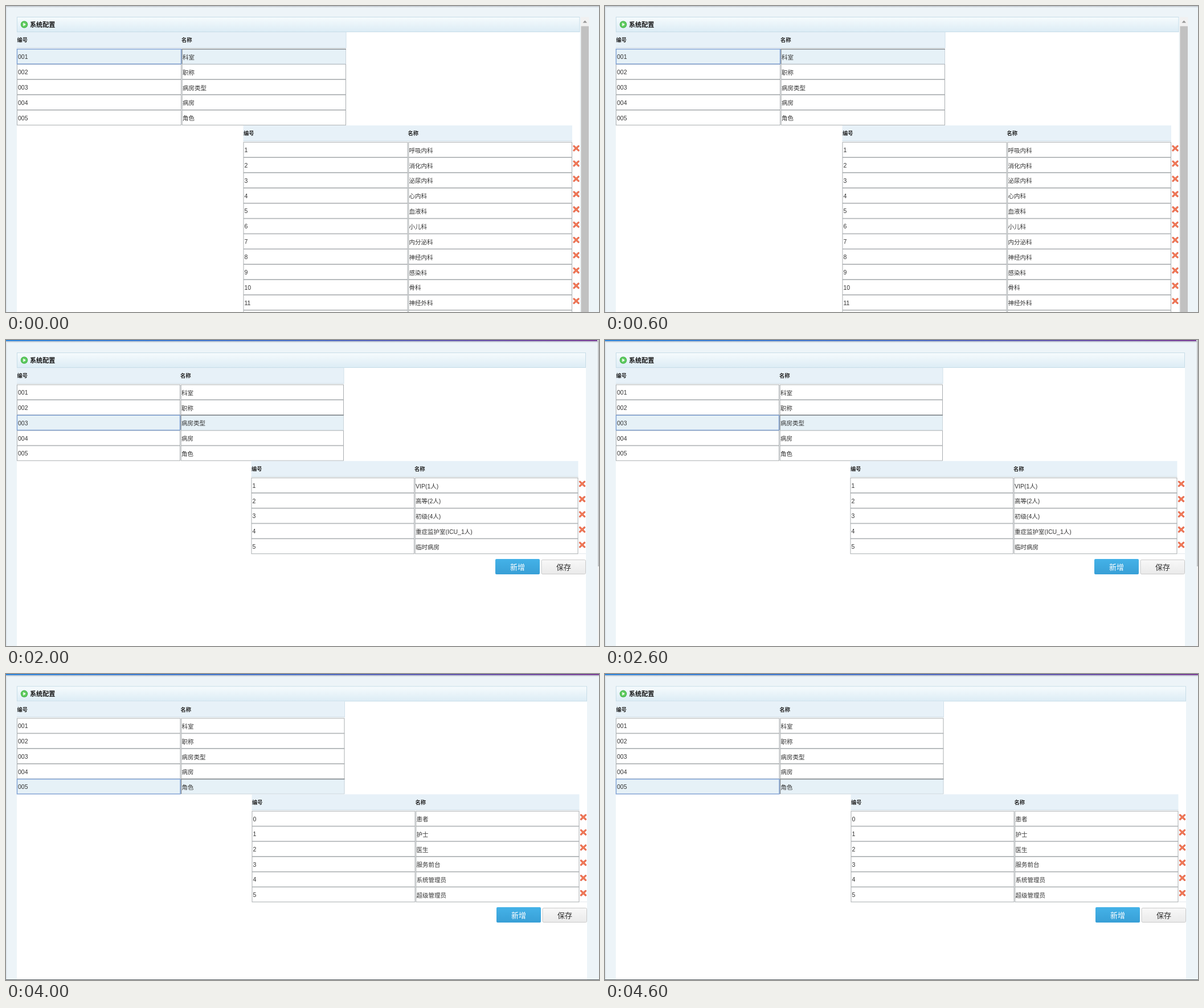
Animation of 1041 by 538 pixels, one loop 5000 ms. Source, as an HTML page:

```html
<!DOCTYPE html>
<html lang="zh-CN">
<head>
<meta charset="utf-8">
<title>系统配置</title>
<style>
html, body { margin: 0; width: 100%; height: 100%; overflow: hidden; background: #edf4f8; }
svg { display: block; width: 1041px; height: 538px; }
text { font: 10.5px "Liberation Sans", "Noto Sans CJK SC", "Noto Sans CJK", sans-serif; fill: #333; }
.title { font-size: 11.1px; font-weight: bold; fill: #111; }
.head { font-size: 9.3px; font-weight: bold; fill: #222; }
.button { font-size: 13px; text-anchor: middle; }
.screen { visibility: hidden; animation: show 5s step-end infinite; }
@keyframes show { 0% { visibility: visible; } 20%, 100% { visibility: hidden; } }
</style>
</head>
<body>
<svg id="stage" viewBox="0 0 1041 538">
  <defs>
    <linearGradient id="bar" x2="0" y2="1"><stop stop-color="#f6fbfd"/><stop offset="1" stop-color="#dcecf5"/></linearGradient>
    <linearGradient id="blue" x2="0" y2="1"><stop stop-color="#44b2e8"/><stop offset="1" stop-color="#389fd6"/></linearGradient>
    <linearGradient id="gray" x2="0" y2="1"><stop stop-color="#f8f8f8"/><stop offset="1" stop-color="#eaeaea"/></linearGradient>
    <linearGradient id="accent"><stop stop-color="#2f86dc"/><stop offset=".5" stop-color="#4a6fc8"/><stop offset="1" stop-color="#7b3f98"/></linearGradient>
    <linearGradient id="shade" x2="0" y2="1"><stop stop-color="#b9c0c8"/><stop offset="1" stop-color="#edf4f8"/></linearGradient>
    <g id="delete" fill="none" stroke-linecap="round">
      <path d="M-4-3.8 4 3.8M4-3.8-4 3.8" stroke="#dc6049" stroke-width="3.2"/>
      <path d="M-3.8-3.7 3.8 3.6M3.8-3.7-3.8 3.6" stroke="#f57d58" stroke-width="1.7"/>
    </g>
    <g id="play">
      <circle r="6.2" fill="#43b649"/>
      <circle r="5" fill="#62cc62"/>
      <path d="M-1.7-3 2.8 0-1.7 3z" fill="#fff"/>
    </g>
  </defs>
</svg>
<script>
const categories = ['科室', '职称', '病房类型', '病房', '角色'];
const wards = ['VIP(1人)', '高等(2人)', '初级(4人)', '重症监护室(ICU_1人)'];
const numbered = (names, first = 1) => names.map((name, i) => [i + first, name]);
const rooms = [...wards, ...wards, wards[2], wards[1], wards[0], '']
  .map((name, i) => [i < 8 ? 101 + i : 193 + i, name]);

// x, split, end: left table; rx, rsplit, rend: right table
const screens = [
  { x: 19, top: 19, right: 1007.5, split: 308, end: 597, rx: 416.5, rsplit: 705.5, rend: 994, pitch: 26.85, thumb: 538,
    rows: numbered(['呼吸内科', '消化内科', '泌尿内科', '心内科', '血液科', '小儿科', '内分泌科', '神经内科', '感染科', '骨科', '神经外科', '']) },
  { x: 20.5, top: 19.7, right: 1020, split: 307.5, end: 595, rx: 432.5, rsplit: 719, rend: 1006.5, pitch: 26.8,
    rows: numbered(['住院医师', '主治医师', '副主任医师', '主任医师']) },
  { x: 19, top: 22, right: 1018, split: 306, end: 593, rx: 430.5, rsplit: 717, rend: 1004.5, pitch: 26.8, accent: 1038, edge: 398,
    rows: numbered([...wards, '临时病房']) },
  { x: 18.5, top: 19.5, right: 1006, split: 307, end: 595.5, rx: 415.5, rsplit: 704, rend: 992.5, pitch: 26.73, thumb: 415, footer: true,
    rows: rooms },
  { x: 19, top: 21.3, right: 1020, split: 306.5, end: 594.5, rx: 431.5, rsplit: 718.5, rend: 1006.5, pitch: 26.7, accent: 1041, footer: true,
    rows: numbered(['患者', '护士', '医生', '服务前台', '系统管理员', '超级管理员'], 0) },
];

const rect = (x, y, w, h, fill, extra = '') =>
  `<rect x="${x}" y="${y}" width="${w}" height="${h}" fill="${fill}" ${extra}/>`;
const text = (x, y, value, cls = '', extra = '') =>
  `<text x="${x}" y="${y}" class="${cls}" ${extra}>${value}</text>`;
const use = (id, x, y) => `<use href="#${id}" x="${x}" y="${y}"/>`;
const line = (path, color, width = 1) =>
  `<path d="${path}" fill="none" stroke="${color}" stroke-width="${width}"/>`;

function table(x, split, end, y, rows, pitch, selected = -1) {
  const first = y + 29.7;
  const height = pitch - .6;
  const cell = (left, right, top) =>
    rect(left + .5, top, right - left - 1, height, '#fff', 'stroke="#a9adb0"');

  let out = rect(x, y, end - x, 27.5, '#e7f1f8')
    + line(`M${x} ${y + 27.5}H${end}`, '#cbd9e2')
    + text(x + .5, y + 17.2, '编号', 'head')
    + text(split, y + 17.2, '名称', 'head');
  rows.forEach((row, i) => {
    const top = first + i * pitch;
    if (i !== selected) out += cell(x, split, top) + cell(split + .8, end, top);
  });
  if (selected >= 0) {
    const top = first + selected * pitch, bottom = top + height;
    out += line(`M${end} ${y}v28`, '#d0e0ea')
      + rect(x, top, end - x, height, '#e6f1f7')
      + line(`M${split + 1} ${bottom}H${end - .5}V${top}`, '#c9d3da')
      + line(`M${split + 1} ${bottom}V${top}H${end}`, '#858b90', 1.4)
      + rect(x + .5, top, split - x - 1, height, 'none', 'stroke="#7d9fd3" stroke-width="1.4"');
  }
  rows.forEach(([id, name], i) => {
    const top = first + i * pitch;
    out += text(x + 2, top + 17.4, id) + text(split + 2, top + 18.1, name);
  });
  return out;
}

function buttons(right, y) {
  return rect(right - 159, y, 78, 27, 'url(#blue)', 'rx="2"')
    + text(right - 120, y + 18.6, '新增', 'button', 'style="fill:#fff"')
    + rect(right - 78, y + 1.5, 77.5, 25, 'url(#gray)', 'rx="2" stroke="#cacaca"')
    + text(right - 39, y + 18.6, '保存', 'button');
}

function scrollbar(x, y, end) {
  return rect(x, y, 14.5, 538 - y, '#f1f1f1')
    + rect(x + .5, y + 16, 13.5, end - y - 16, '#c1c1c1')
    + `<path d="M${x + 3.5} ${y + 10}l3.8-4 3.8 4z" fill="#949494"/>`;
}

function screen(s, index) {
  const { x, top, right, pitch } = s;
  const rightTop = top + 56.7 + categories.length * pitch;
  const bottom = rightTop + 29 + s.rows.length * pitch;
  let out = rect(0, 0, 1041, 538, '#edf4f8')
    + line('M.8 2V538', '#d5dee4')
    + rect(0, s.accent ? 2 : 0, 1041, 3, 'url(#shade)');
  if (s.accent) out += rect(0, 0, s.accent, 2, 'url(#accent)');
  out += rect(x, top, right - x, 538 - top, '#fff')
    + rect(x + .5, top + .5, right - x - 1, 26, 'url(#bar)', 'stroke="#c7dde8"')
    + use('play', x + 13, top + 13.5)
    + text(x + 23, top + 18, '系统配置', 'title')
    + table(x, s.split, s.end, top + 27, numbered(categories).map(([n, name]) => ['00' + n, name]), pitch, index)
    + table(s.rx, s.rsplit, s.rend, rightTop, s.rows, pitch);
  s.rows.forEach((row, i) => { out += use('delete', s.rend + 7, rightTop + 40.2 + i * pitch); });
  if (s.thumb) out += scrollbar(right + 1.5, top + .5, s.thumb);
  else out += line(`M${s.rend + 1} ${bottom}H${right}`, '#e2e8ec') + buttons(right, Math.round(bottom + 9));
  if (s.edge) out += rect(1039, 0, 2, 538, '#f1f1f1') + rect(1039, 0, 2, s.edge, '#bfc1c3');
  if (s.footer) out += rect(0, 537, 1041, 1, '#555b60');
  return `<g class="screen" style="animation-delay:${index - 5}s">${out}</g>`;
}

document.getElementById('stage').insertAdjacentHTML('beforeend', screens.map(screen).join(''));
</script>
</body>
</html>
```
